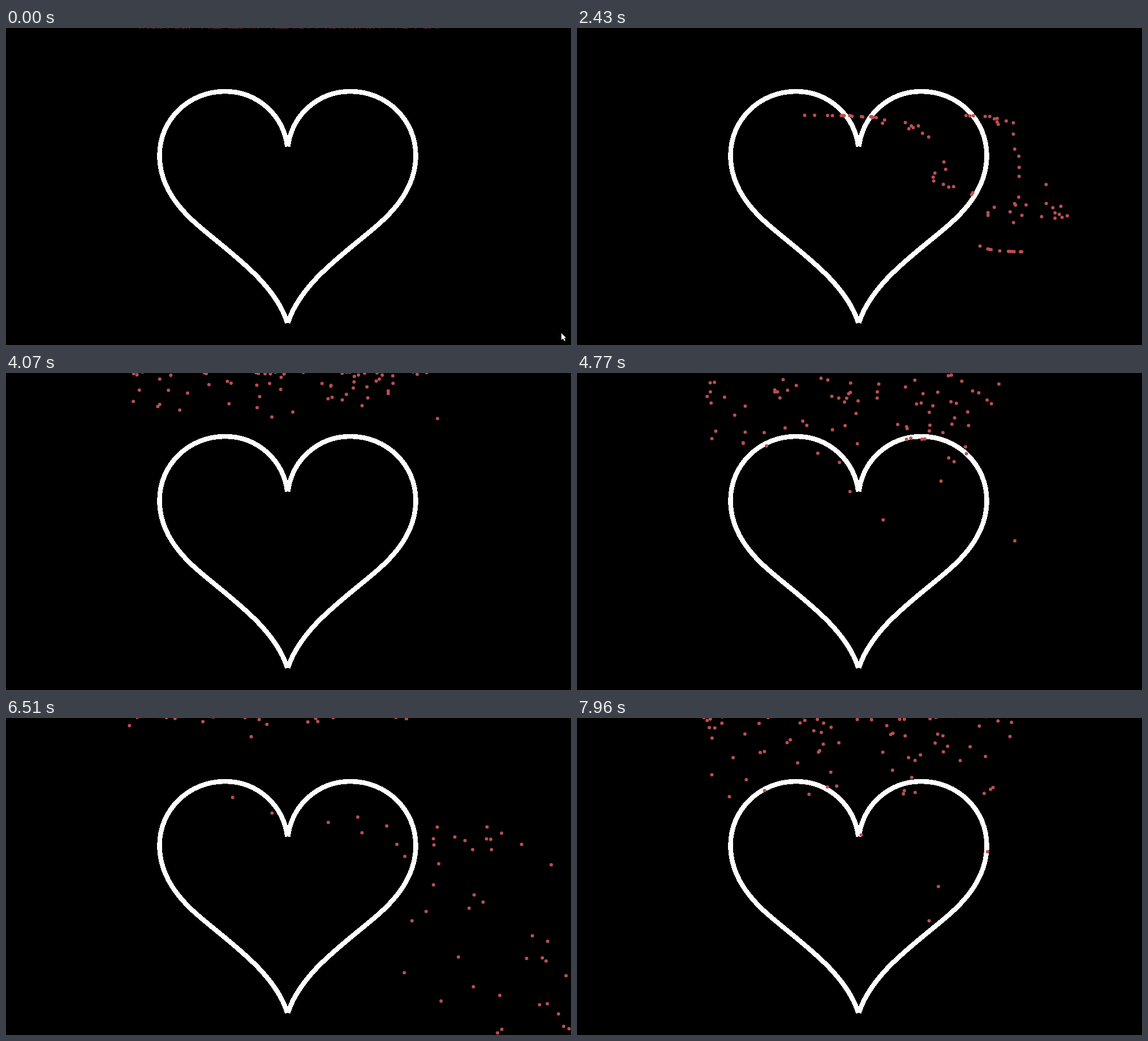
Write an HTML page with a canvas that moves like this. It is 999x560 px and loops after 7.99 s.

```html
<!DOCTYPE html>
<html lang="en">
<head>
<meta charset="utf-8">
<title>Heart</title>
<style>
html, body { margin: 0; width: 100%; height: 100%; overflow: hidden; background: #000; }
svg, canvas { position: absolute; left: 0; top: 0; }
</style>
</head>
<body>
<svg width="999" height="560" fill="none" stroke="#fff" stroke-width="8.5" shape-rendering="crispEdges">
  <path id="half" d="M497.5 209.5C490 152 443 112 387 112C323 112 271.5 162 271.5 225
    C271.5 280 306 321 347 355C400 400 476 452 497.5 521"/>
  <use href="#half" transform="matrix(-1 0 0 1 996 0)"/>
</svg>
<canvas id="stage" width="999" height="560"></canvas>
<script>
const W = 999, H = 560, LOOP = 7990, START = 260, STEP = 30.4, DOTS = 86;
const GRAVITY = 109, WIND = 12, PULL = 404, SWEEP = 1800;
const ctx = document.getElementById('stage').getContext('2d');

let seed = 20117;
function rnd() {
  seed = (seed * 1664525 + 1013904223) % 4294967296;
  return seed / 4294967296;
}

function smooth(a, b, v) {
  const u = Math.min(1, Math.max(0, (v - a) / (b - a)));
  return u * u * (3 - 2 * u);
}

// Slope of the two lobes: -1 lifts, +1 pulls down.
function slope(x) {
  return Math.tanh((x - 414) / 38) - Math.tanh((x - 511) / 4) + Math.tanh((x - 639) / 39);
}

function force(d) {
  let ax = WIND, ay = GRAVITY;
  if (d.y > 75) {
    const s = slope(d.x);
    const sweep = smooth(95, 150, d.y);
    if (d.x < 690) {
      ax += SWEEP * d.kick * sweep * (s < 0 ? 1 : 0.6);
      if (s > 0 || d.vy > 75) ay += PULL * s * (1 - sweep * 0.7);
    } else {
      ax -= 1.2 * d.vx * sweep;
      ay += PULL * s * (1 - 0.6 * smooth(120, 220, d.y));
    }
  }
  return [ax, ay];
}

function respawn(d) {
  d.x = 214 + rnd() * 556;
  d.y = -9 * rnd();
  d.vx = d.vy = 0;
  d.kick = 0.45 + 0.7 * rnd();
  d.wait = 1.2 * rnd();
}

function advance(d) {
  const dt = STEP / 1000;
  if (d.wait > 0) {
    d.wait -= dt;
    return;
  }
  const [ax, ay] = force(d);
  d.x += d.vx * dt + ax * dt * dt / 2;
  d.y += d.vy * dt + ay * dt * dt / 2;
  d.vx += ax * dt;
  d.vy += ay * dt;
  if (d.x > W + 3 || d.y > H + 3) respawn(d);
}

// Every state of the loop, so that drawing depends on the time alone.
function simulate() {
  const dots = Array.from({ length: DOTS }, () => (
    { x: 235 + 532 * rnd(), y: -2.5, vx: 0, vy: 0, kick: 0.8 + 0.4 * rnd(), wait: 0 }
  ));
  const states = [];
  for (let n = 0; n <= (LOOP - START) / STEP + 1; n++) {
    states.push(dots.map(d => [d.x, d.y]));
    dots.forEach(advance);
  }
  return states;
}

const states = simulate();
const arrow = new Path2D('M0 0V12L3 9.5L5 14L7 13L5 8.5H8.5Z');

function drawCursor(t) {
  if (t >= 320) return;
  const [x, y] = t < 30 ? [982, 539] : t < 70 ? [976, 530] : t < 290 ? [970, 521] : [988, 517];
  ctx.save();
  ctx.translate(x, y);
  ctx.fillStyle = '#fff';
  ctx.fill(arrow);
  ctx.restore();
}

function draw(t) {
  const n = Math.max(0, Math.floor((t - START) / STEP));
  ctx.clearRect(0, 0, W, H);
  ctx.fillStyle = '#bb4f4f';
  ctx.beginPath();
  for (const [x, y] of states[n]) {
    ctx.moveTo(x + 3, y);
    ctx.arc(x, y, 3, 0, 2 * Math.PI);
  }
  ctx.fill();
  drawCursor(t);
}

const t0 = performance.now();
function tick() {
  draw((performance.now() - t0) % LOOP);
  requestAnimationFrame(tick);
}
tick();
</script>
</body>
</html>
```
